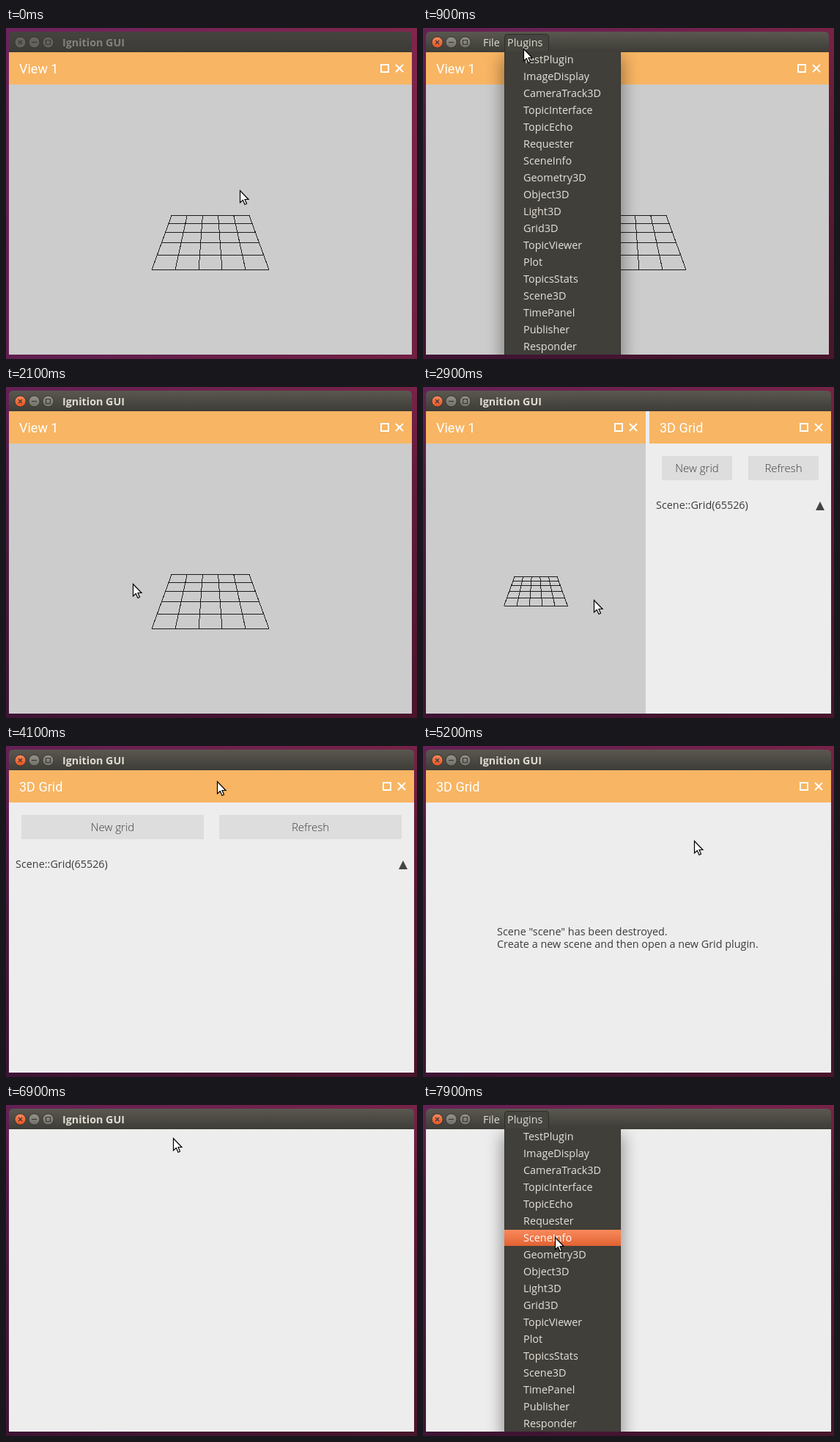
Write an HTML page that moves like this. It is 561 px wide and 451 px high and loops after 8000 ms.

```html
<!DOCTYPE html>
<html lang="en">
<head>
<meta charset="utf-8">
<title>Ignition GUI</title>
<style>
  html, body { margin: 0; width: 100%; height: 100%; overflow: hidden; background: #5d1a4f; }
  svg { display: block; width: 561px; height: 451px; }
  text { font: 14.4px "Open Sans", "Noto Sans", sans-serif; fill: #3c3c3c; white-space: pre; }
  .title { font-weight: 700; font-size: 14.3px; fill: #dfdbd2; }
  .bar { fill: #dfdbd2; }
  .blur .title, .blur .bar { fill: #85827b; }
  .head { font: 18px Roboto, sans-serif; fill: #fff; }
  .btn { font-size: 15px; font-weight: 300; text-anchor: middle; }
  .item { fill: #e6e2da; }
  .on { fill: #fff; }
  .icon { fill: none; stroke: #fff; stroke-width: 2; }
  .grid { fill: none; stroke: #1c1c1c; shape-rendering: crispEdges; }
</style>
</head>
<body>
<svg viewBox="0 0 561 451">
  <defs>
    <linearGradient id="desk"><stop stop-color="#70245f"/><stop offset="1" stop-color="#85264f"/></linearGradient>
    <linearGradient id="shade" x2="0" y2="1"><stop stop-opacity=".1"/><stop offset=".3" stop-opacity=".28"/><stop offset="1" stop-opacity=".45"/></linearGradient>
    <linearGradient id="active" x2="0" y2="1"><stop stop-color="#5a584f"/><stop offset="1" stop-color="#3d3c37"/></linearGradient>
    <linearGradient id="idle" x2="0" y2="1"><stop stop-color="#45443f"/><stop offset="1" stop-color="#3c3b37"/></linearGradient>
    <linearGradient id="hot" x2="0" y2="1"><stop stop-color="#f98a5c"/><stop offset="1" stop-color="#e26232"/></linearGradient>
    <linearGradient id="orange" x2="0" y2="1"><stop stop-color="#f58a61"/><stop offset="1" stop-color="#e2531f"/></linearGradient>
    <linearGradient id="grey" x2="0" y2="1"><stop stop-color="#95938a"/><stop offset="1" stop-color="#706e66"/></linearGradient>
    <filter id="soft" x="-50%" y="-20%" width="200%" height="140%"><feGaussianBlur stdDeviation="11"/></filter>
    <clipPath id="body"><rect x="4" y="33" width="553" height="412"/></clipPath>
  </defs>
  <g id="stage"></g>
</svg>
<script>
const LOOP = 8000, STEP = 100;
const FOCUS = 800, SPLIT = 2300, SOLO = 4000, GONE = 5200, EMPTY = 6700;
const PLUGINS = ['TestPlugin', 'ImageDisplay', 'CameraTrack3D', 'TopicInterface', 'TopicEcho',
  'Requester', 'SceneInfo', 'Geometry3D', 'Object3D', 'Light3D', 'Grid3D', 'TopicViewer',
  'Plot', 'TopicsStats', 'Scene3D', 'TimePanel', 'Publisher', 'Responder'];

// pointer stops: time, x, y
const PATH = [
  [0, 319, 221], [500, 135, 14], [800, 135, 14], [1500, 166, 270], [1600, 166, 270],
  [1700, 171, 265], [1800, 171, 265], [1900, 171, 267], [2000, 171, 267],
  [2900, 233, 290], [3400, 470, 108], [3800, 288, 48], [4200, 288, 48],
  [4800, 378, 112], [5100, 378, 112], [5600, 300, 273], [6000, 332, 66],
  [6100, 345, 81], [6500, 543, 48], [6600, 543, 48], [6900, 228, 45],
  [7200, 142, 18], [7500, 145, 22], [7900, 180, 180], [8000, 180, 180]];

function pointer(t) {
  const i = PATH.findIndex(p => p[0] > t);
  const [t0, x0, y0] = PATH[i - 1], [t1, x1, y1] = PATH[i];
  const u = (t - t0) / (t1 - t0), k = u * u * (3 - 2 * u);
  return { x: Math.round(x0 + (x1 - x0) * k), y: Math.round(y0 + (y1 - y0) * k) };
}

const rect = (x, y, w, h, fill, more = '') =>
  `<rect x="${x}" y="${y}" width="${w}" height="${h}" fill="${fill}" ${more}/>`;
const text = (x, y, cls, s) => `<text x="${x}" y="${y}" class="${cls}">${s}</text>`;
const path = (d, more) => `<path d="${d}" ${more}/>`;
const snap = v => Math.floor(v) + 0.5;

function header(l, r, name) {
  return rect(l, 33, r - l, 44, '#f8b563') + text(l + 14, 62, 'head', name) +
    path(`M${r - 42} 50h10v10h-10z`, 'class="icon"') +
    path(`M${r - 22} 50l10 10m0-10l-10 10`, 'class="icon"');
}

// floor grid of five by five cells seen in perspective
function floorGrid(cx, top, bottom, far, near) {
  let d = '';
  for (let i = 0; i <= 5; i++) {
    const s = i / 5, w = 1 / (1 / far + s * (1 / near - 1 / far));
    const y = snap(top + (w - far) / (near - far) * (bottom - top));
    d += `M${cx - w / 2} ${y}H${cx + w / 2}M${cx + (s - 0.5) * far} ${top}L${cx + (s - 0.5) * near} ${bottom}`;
  }
  return path(d, 'class="grid"');
}

function view(r, grid) {
  return rect(4, 77, r - 4, 368, '#ccc') + header(4, r, 'View 1') + floorGrid(...grid);
}

function button(x, w, label, p) {
  const over = p.x >= x && p.x < x + w && p.y >= 94 && p.y < 127;
  return rect(x, 94, w, 33, over ? '#d0d0d0' : '#ddd') + text(x + w / 2, 116, 'btn', label);
}

function gridPanel(l, p) {
  const x = l + 17, w = (518 - l - 4 + 0.5 - 21 + 21) / 2 - 0.25 - 0.5 * 10.5 + 0.25;
  const bw = Math.round((540 - x - 22) / 2);
  return header(l, 557, '3D Grid') + button(x, bw, 'New grid', p) +
    button(540 - bw, bw, 'Refresh', p) +
    text(l + 9, 166, '', 'Scene::Grid(65526)') +
    path('M542 156l6 12h-12z', 'fill="#444"');
}

function content(t, p) {
  if (t < SPLIT) return view(554, [279, 255.5, 329.5, 106, 160]);
  if (t < SOLO) return view(304, [154, 258.5, 298.5, 58, 87]) + gridPanel(309, p);
  if (t < GONE) return gridPanel(4, p);
  if (t < EMPTY) return header(4, 557, '3D Grid') +
    text(101, 258, '', 'Scene "scene" has been destroyed.') +
    text(101, 275, '', 'Create a new scene and then open a new Grid plugin.');
  return '';
}

function titleBar(right, focus, open, p) {
  const dot = (x, fill, d) =>
    `<circle cx="${x}" cy="19.5" r="7.6" fill="${fill}" stroke="#34332f"/>` +
    path(d, 'fill="none" stroke="#3a3834" stroke-width="1.2"');
  const off = '#64625b';
  let s = path(`M4 33V11q0-6 6-6H${right - 6}q6 0 6 6V33z`, `fill="url(#${focus ? 'active' : 'idle'})"`);
  s += dot(19.5, focus ? 'url(#orange)' : off, 'M17 17l5 5m0-5l-5 5');
  s += dot(38.5, focus ? 'url(#grey)' : off, 'M35 19.5h7');
  s += dot(57.5, focus ? 'url(#grey)' : off, 'M54.5 16.5h6v6h-6z');
  if (!open && p.y >= 33) return s + text(77, 25, 'title', 'Ignition GUI');
  if (open) s += path('M111.5 33V12q0-3.500 3.500-3.500H168q3.500 0 3.500 3.500V33', 'fill="#45443e" stroke="#2f2e2a"');
  return s + text(82, 25, 'bar', 'File') + text(115, 25, 'bar', 'Plugins');
}

function menu(p) {
  const hot = p.y < 32 ? -1 : Math.floor((p.y - 32) / 23);
  let s = `<g clip-path="url(#body)">${rect(108, 40, 165, 420, '#000', 'opacity=".38" filter="url(#soft)"')}</g>`;
  s += rect(111, 32, 159, 413, '#403f3a') + path('M111.5 32V445M269.5 32V445', 'stroke="#33322e"');
  PLUGINS.forEach((name, i) => {
    if (i === hot) s += rect(111, 32 + 23 * i, 159, 22, 'url(#hot)');
    s += text(137, 48 + 23 * i, i === hot ? 'on' : 'item', name);
  });
  return s;
}

function scene(t) {
  const p = pointer(t), focus = t >= FOCUS, right = t < SPLIT ? 554 : 557;
  const open = (t >= FOCUS && t < 2100) || t >= 7300;
  return rect(0, 0, 561, 451, 'url(#desk)') +
    rect(0, 0, 561, 451, 'url(#shade)', `opacity="${focus ? 1 : 0.35}"`) +
    rect(4, 33, right - 4, 412, '#ededed') + content(t, p) +
    `<g class="${focus ? '' : 'blur'}">${titleBar(right, focus, open, p)}</g>` +
    (open ? menu(p) : '') +
    path('M.5.500V17L4.300 13.500 7 19.500 9.500 18.300 7 12.500H12z',
      `transform="translate(${p.x} ${p.y})" fill="#fff" stroke="#000" stroke-width="1.2"`);
}

const stage = document.getElementById('stage');
const start = performance.now();
let last = -1;
function tick() {
  const t = Math.floor((performance.now() - start) % LOOP / STEP) * STEP;
  if (t !== last) stage.innerHTML = scene(last = t);
  requestAnimationFrame(tick);
}
tick();
</script>
</body>
</html>
```
